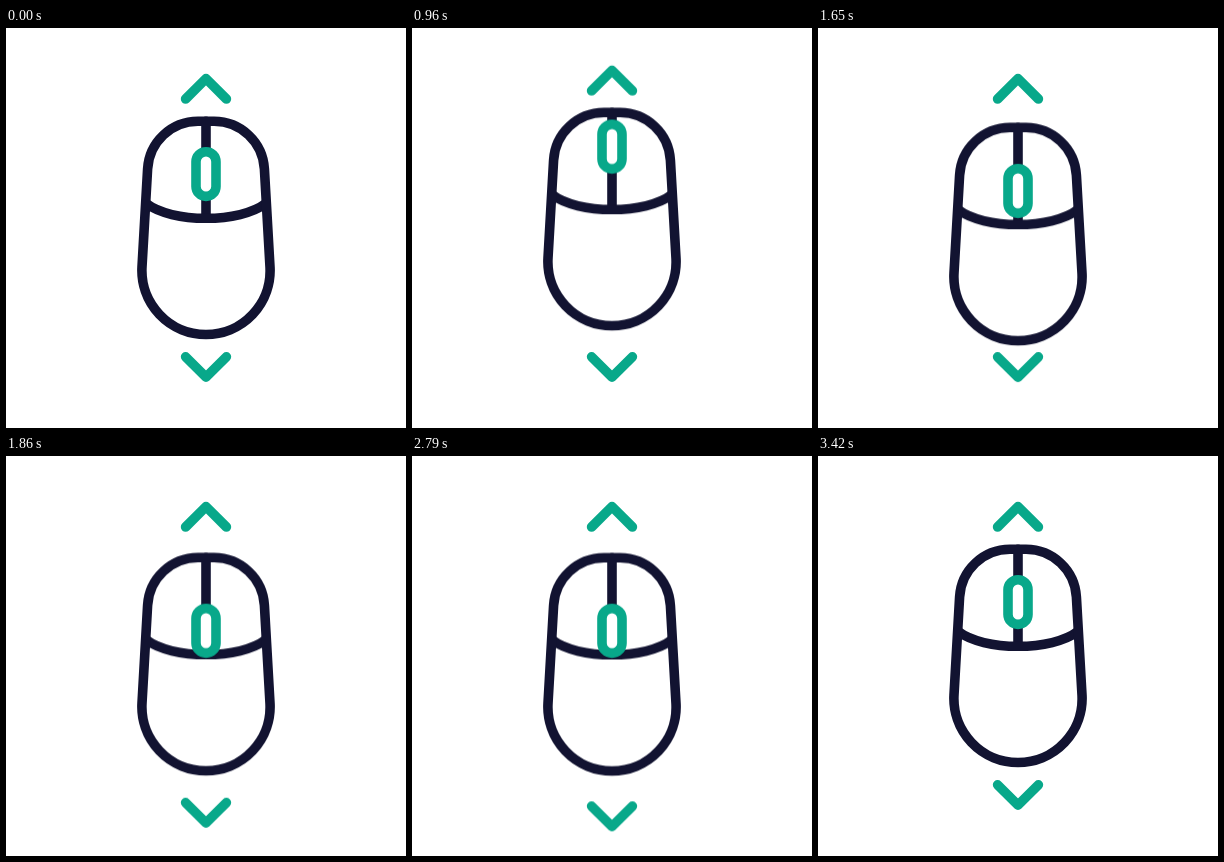
An HTML page for the animation above (4450 ms loop, 400 by 400 pixels).

```html
<!DOCTYPE html>
<html lang="en">
<head>
<meta charset="utf-8">
<title>Mouse scroll</title>
<style>
  html, body { margin: 0; width: 100%; height: 100%; overflow: hidden; background: #fff; }
  svg { display: block; width: 100%; height: 100%; }
  .line { fill: none; stroke: #121331; stroke-width: 9.6; stroke-linecap: round; stroke-linejoin: round; }
  .accent { fill: none; stroke: #08a88a; stroke-width: 9.6; stroke-linecap: round; stroke-linejoin: round; }
  .wheel { fill: #fff; }
  .mouse, .wheel, .up, .down { animation: 4450ms cubic-bezier(.45, 0, .25, 1) infinite; }
  .mouse { animation-name: mouse; }
  .wheel { animation-name: wheel; }
  .up { animation-name: up; }
  .down { animation-name: down; }

  @keyframes up {
    0%, 18.4%, 36.74%, 100% { transform: translateY(0); }
    9.17%, 27.64% { transform: translateY(-21px); }
  }
  @keyframes down {
    0%, 36.74%, 54.6%, 73.6%, 100% { transform: translateY(0); }
    45.6%, 63.6% { transform: translateY(21.5px); }
  }
  @keyframes mouse {
    0%, 74.5%, 100% { transform: translateY(0); }
    9.17%, 25.28% { transform: translateY(-8.8px); }
    44.49%, 64.04% { transform: translateY(8.5px); }
  }
  /* relative to the mouse body */
  @keyframes wheel {
    0%, 16.5%, 54.94%, 74.16%, 100% { transform: translateY(0); }
    8.1%, 9.4% { transform: translateY(-22px); }
    25.6%, 31% { transform: translateY(-23px); }
    42.5%, 45.84%, 64.04% { transform: translateY(20.5px); }
  }
</style>
</head>
<body>
<svg viewBox="0 0 400 400">
  <g class="mouse">
    <path class="line" d="M200 93.3V190.3"/>
    <path class="line" d="M140 175.3C153 185.3 176 190.3 200 190.3S247 185.3 260 175.3"/>
    <path class="line" d="M192 93.3H208A50.5 50.5 0 0 1 258.4 141L264 238.9A64.1 64.1 0 0 1 200 306.5A64.1 64.1 0 0 1 136 238.9L141.6 141A50.5 50.5 0 0 1 192 93.3Z"/>
    <rect class="accent wheel" x="190" y="123.8" width="20" height="44.6" rx="10"/>
  </g>
  <path class="accent up" d="M179.6 71L200 50.6L220.4 71"/>
  <path class="accent down" d="M179.6 328.8L200 349.2L220.4 328.8"/>
</svg>
</body>
</html>
```
